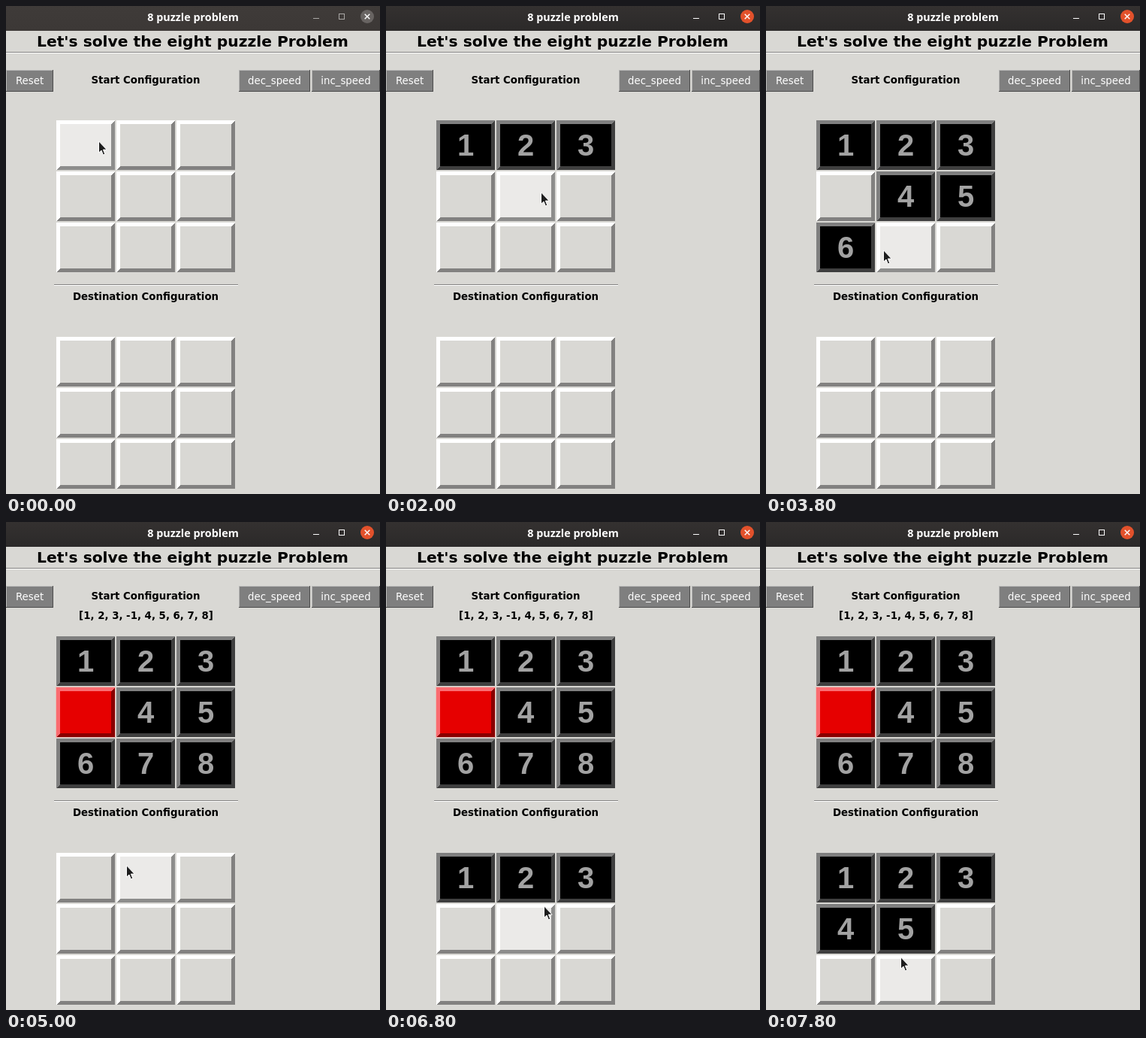
Animation of 498x649 px, one loop 8 s. Source, as an HTML page:

```html
<!DOCTYPE html>
<html lang="en">
<head>
<meta charset="utf-8">
<title>8 puzzle problem</title>
<style>
  html, body { margin: 0; width: 100%; height: 100%; overflow: hidden; background: #d9d8d4; }
  svg { display: block; width: 498px; height: 649px; }
  text { font: 13.33px "DejaVu Sans", sans-serif; text-anchor: middle; white-space: pre; }
  .bold { font-weight: bold; }
  .head { font-size: 20.25px; }
  .title { font: bold 14.4px "Noto Sans", sans-serif; fill: #fff; }
  .digit { font: bold 40px "Liberation Sans", Arial, sans-serif; fill: #a2a2a2; }
  .crisp { shape-rendering: crispEdges; }
</style>
</head>
<body>
<svg viewBox="0 0 498 649" xmlns="http://www.w3.org/2000/svg">
  <defs>
    <linearGradient id="idle" x2="0" y2="1">
      <stop stop-color="#3f3b39"/><stop offset="1" stop-color="#3c3836"/>
    </linearGradient>
    <linearGradient id="active" x2="0" y2="1">
      <stop stop-color="#343130"/><stop offset="1" stop-color="#2b2929"/>
    </linearGradient>
  </defs>
  <rect width="498" height="649" fill="#d9d8d4"/>
  <rect id="bar" width="498" height="33"/>
  <text class="title" x="249" y="20">8 puzzle problem</text>
  <path id="controls" class="crisp" fill="none" d="M409 16.5h8M443.5 10.5h7v7h-7z"/>
  <circle id="close" cx="481" cy="14" r="9"/>
  <path d="M477.7 10.7l6.6 6.6m0-6.6l-6.6 6.6" stroke="#fff" stroke-width="1.4"/>

  <text class="bold head" x="248.5" y="54">Let's solve the eight puzzle Problem</text>
  <g id="lines"></g>
  <g id="buttons"></g>
  <text class="bold" x="186" y="103">Start Configuration</text>
  <text class="bold" x="186.5" y="129" id="list">[1, 2, 3, -1, 4, 5, 6, 7, 8]</text>
  <text class="bold" x="186" y="391">Destination Configuration</text>
  <g id="cells"></g>
  <path id="cursor" d="M-.5 .8V16.2L3 13 5.4 19 7.8 18 5.4 12.1H10.2Z" fill="#1d1d1d" stroke="#fff"/>
</svg>
<script>
const LOOP = 8000, STEP = 100, FOCUS = 5, TRAVEL = 3;
const W = 78, H = 66, EDGE = 5, BLANK = 3;
const START = { x: 124, y: 179 };

// For each tile in turn: the step the pointer sets off, the step the tile fills
const visits = [
  [0, 8], [8, 10], [12, 18], [19, 26], [28, 32], [32, 38], [37, 40], [42, 46],
  [49, 55], [55, 60], [61, 65], [68, 73], [73, 78], [78, Infinity]
];
const solvedAt = visits[7][1];

// Tiles fill in reading order around the blank; the last trip goes straight down
const cellOf = n => n < visits.length - 1 ? n + (n >= BLANK) : 16;

// Face, upper-left edge, lower-right edge
const looks = {
  plain:   ["#d9d8d4", "#ffffff", "#828180"],
  hover:   ["#ebeae8", "#ffffff", "#8d8d8c"],
  pressed: ["#ebeae8", "#8d8d8c", "#ffffff"],
  filled:  ["#000000", "#7f7f7f", "#3f3f3f"],
  blank:   ["#e60000", "#fa6b70", "#8a0000"]
};

const $ = id => document.getElementById(id);

function add(parent, tag, attrs, label = "") {
  const el = document.createElementNS("http://www.w3.org/2000/svg", tag);
  for (const key in attrs) el.setAttribute(key, attrs[key]);
  el.textContent = label;
  return parent.appendChild(el);
}

function rect(parent, x, y, width, height, fill) {
  return add(parent, "rect", { x, y, width, height, fill, class: "crisp" });
}

function rule(x, y, width) {
  rect($("lines"), x, y, width, 1, "#828180");
  rect($("lines"), x, y + 1, width, 1, "#fff");
}

function button(x, width, label) {
  const g = $("buttons");
  rect(g, x, 85, width, 29, "#4c4c4c");
  rect(g, x, 85, width - 1, 28, "#b8b8b7");
  rect(g, x + 1, 86, width - 2, 27, "#7f7f7f");
  add(g, "text", { x: x + width / 2, y: 104, fill: "#fff" }, label);
}

function makeCell(_, i) {
  const col = i % 3;
  const x = 67 + col * 80;
  const y = (i < 9 ? 152 : 440) + Math.floor(i % 9 / 3) * 68;
  const g = add($("cells"), "g", { transform: `translate(${x} ${y})` });
  const rim = rect(g, -1, -1, W + 2, H + 2, "#e9b9b4");
  const low = rect(g, 0, 0, W, H);
  const high = add(g, "path", {
    d: `M0 0H${W}l${-EDGE} ${EDGE}H${EDGE}V${H - EDGE}L0 ${H}Z`, class: "crisp"
  });
  const inset = rect(g, EDGE, EDGE, W - 2 * EDGE, H - 2 * EDGE, "#c00000");
  const face = rect(g, EDGE, EDGE, W - 2 * EDGE, H - 2 * EDGE);
  if (i === BLANK) inset.before(face), inset.setAttribute("fill", "none");
  const n = i - (i > BLANK);
  const digit = add(g, "text", { x: W / 2, y: 47, class: "digit" }, n % 8 + 1);
  const fillAt = i === BLANK ? solvedAt : visits[n]?.[1] ?? Infinity;
  const rest = { x: x + W / 2 + (col ? -6 : 6), y: y + H / 2 + 3 };
  return { x, y, rim, low, high, face, digit, fillAt, rest, isBlank: i === BLANK };
}

rule(0, 61, 498);
rule(64, 370, 245);
button(0, 63, "Reset");
button(310, 95, "dec_speed");
button(407, 91, "inc_speed");
const cells = Array.from({ length: 18 }, makeCell);

const stop = n => n ? cells[cellOf(n)].rest : START;

// The pointer drops quickly to the next row while crossing at an even pace
function pointerAt(step) {
  const n = visits.findLastIndex(v => v[0] <= step);
  const from = stop(Math.max(n - 1, 0)), to = stop(n);
  const p = Math.min((step - visits[n][0] + 1) / TRAVEL, 1);
  return {
    x: Math.round(from.x + (to.x - from.x) * p),
    y: Math.round(from.y + (to.y - from.y) * Math.sin(p * Math.PI / 2))
  };
}

function lookOf(cell, step, { x, y }) {
  if (step >= cell.fillAt) return cell.isBlank ? "blank" : "filled";
  const inside = x >= cell.x && x < cell.x + W && y >= cell.y && y < cell.y + H;
  if (!inside) return "plain";
  return step >= cell.fillAt - 1 ? "pressed" : "hover";
}

const show = (el, on) => el.style.display = on ? "" : "none";

function draw(step) {
  const pointer = pointerAt(step);
  for (const cell of cells) {
    const look = lookOf(cell, step, pointer);
    ["face", "high", "low"].forEach((part, k) => cell[part].setAttribute("fill", looks[look][k]));
    show(cell.digit, look === "filled");
    show(cell.rim, look === "blank");
  }
  const focused = step >= FOCUS;
  $("bar").setAttribute("fill", focused ? "url(#active)" : "url(#idle)");
  $("controls").setAttribute("stroke", focused ? "#fff" : "#aaa8a6");
  $("close").setAttribute("fill", focused ? "#e2512b" : "#686462");
  show($("list"), step >= solvedAt);
  $("cursor").setAttribute("transform", `translate(${pointer.x} ${pointer.y})`);
}

const start = performance.now();
let shown = -1;

function tick() {
  const step = Math.floor((performance.now() - start) % LOOP / STEP);
  if (step !== shown) draw(shown = step);
  requestAnimationFrame(tick);
}
tick();
</script>
</body>
</html>
```
